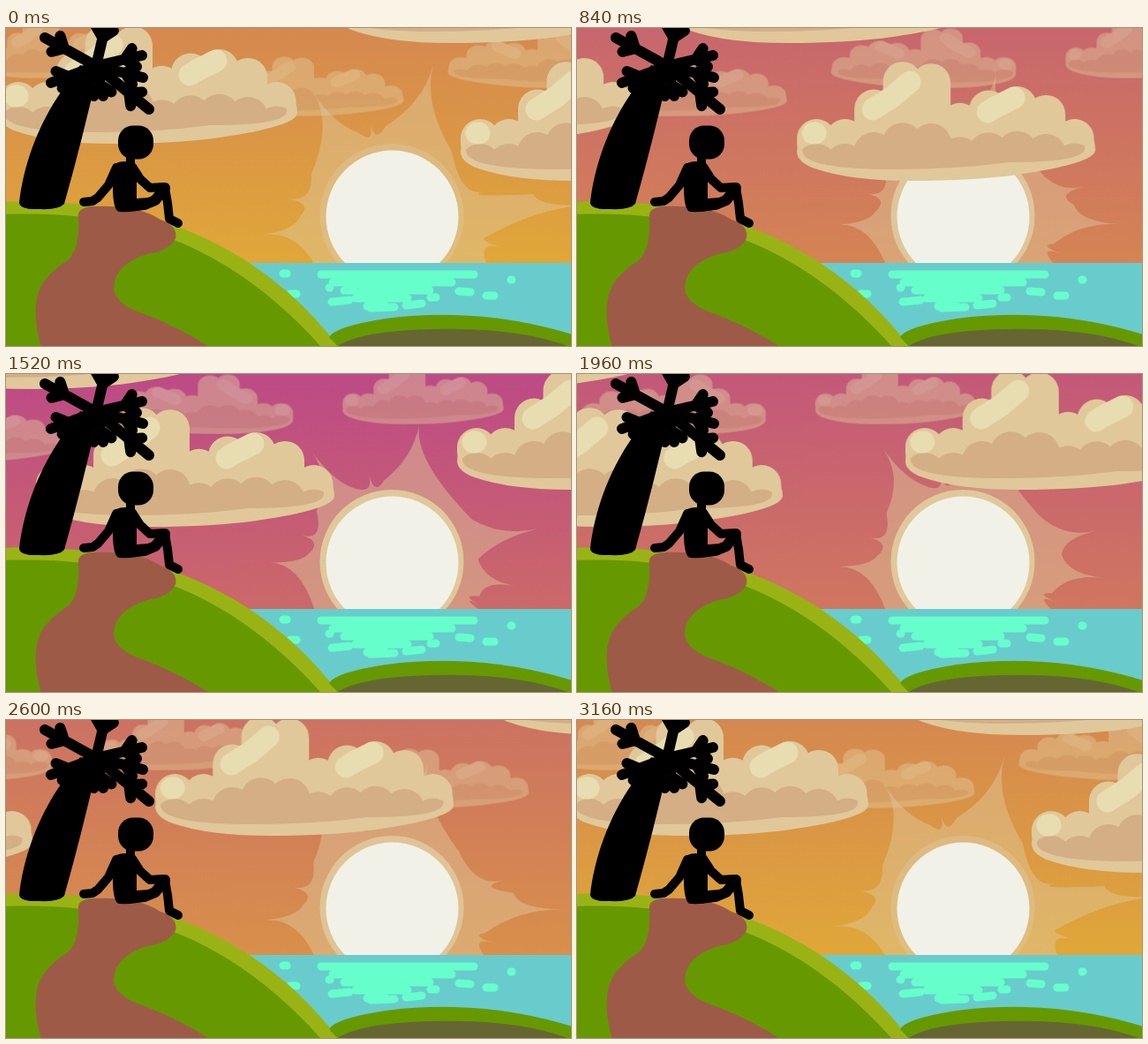
These frames come from a looping animation (640x360 px, 3.2 s). An HTML page:

```html
<!DOCTYPE html>
<html lang="en">
<head>
<meta charset="utf-8">
<title>Sunset hill</title>
<style>
html, body { margin: 0; width: 100%; height: 100%; overflow: hidden; background: #d68a52; }
svg { display: block; width: 640px; height: 360px; }
.near, .far, .dusk, .ring { animation: 3200ms infinite; }
.near { animation-name: near; animation-timing-function: steps(79); }
.far { animation-name: far; animation-timing-function: steps(79); opacity: .46; }
.dusk { animation-name: dusk; }
.ring { animation-name: ring; animation-timing-function: linear; }
@keyframes near { 98.75%, 100% { transform: translateX(-1000px); } }
@keyframes far { 98.75%, 100% { transform: translateX(-800px); } }
@keyframes dusk {
  0% { opacity: 0; animation-timing-function: steps(39); }
  48.75% { opacity: 1; animation-timing-function: steps(40); }
  98.75%, 100% { opacity: 0; }
}
@keyframes ring {
  0%, 98.75%, 100% { opacity: .45; }
  16.25%, 81.25% { opacity: .9; }
  36%, 61.5% { opacity: 1; }
}
.line { fill: none; stroke-linecap: round; stroke-linejoin: round; }
</style>
</head>
<body>
<svg viewBox="0 0 640 360">
  <defs>
    <linearGradient id="day" x2="0" y2="1">
      <stop stop-color="#d58850"/><stop offset="1" stop-color="#e0a738"/>
    </linearGradient>
    <linearGradient id="eve" x2="0" y2="1">
      <stop stop-color="#bd4988"/><stop offset="1" stop-color="#cb676c"/>
    </linearGradient>
    <clipPath id="belly">
      <path d="M6 90V140Q10 160 110 160Q180 160 240 152Q326 152 326 136V90Z"/>
    </clipPath>
    <g id="cloud">
      <path fill="#e0c89b" d="M0 140Q0 152 20 159Q60 173 130 173Q200 173 250 166Q338 153 338 138Q338 118 318 112H12Q2 120 0 140Z"/>
      <path id="puffs" class="line" stroke="#e0c89b" stroke-width="44"/>
      <g clip-path="url(#belly)">
        <path id="shade" class="line" stroke="#d4ae85" stroke-width="46"/>
      </g>
      <path class="line" stroke="#e8ddb0" stroke-width="25" d="M18 119h3M86 92L108 78L128 61M216 95L224 90L246 79"/>
    </g>
  </defs>

  <rect width="640" height="268" fill="url(#day)"/>
  <rect class="dusk" width="640" height="268" fill="url(#eve)"/>

  <g class="far" id="far"></g>

  <path id="rays" fill="#e0c89c" fill-opacity=".47"/>
  <circle class="ring" cx="437" cy="212.5" r="81.5" fill="#e0c89b"/>
  <circle cx="437.5" cy="213.5" r="75" fill="#f2f1e8"/>

  <g class="near" id="near"></g>

  <rect y="266" width="640" height="94" fill="#68cccc"/>
  <g class="line" stroke="#66ffcc" stroke-width="9">
    <path id="glitter"/>
    <path d="M314 278h4M366 294h1M369 310l20-2M413 317l27-1M453 314l18-2M513 298l13 1M572 285h1M322 301h7M481 305h6M544 303h9"/>
  </g>

  <path fill="#9ab314" d="M-5 197C120 191 270 222 376 360H-5Z"/>
  <path fill="#669900" d="M-5 211C110 207 235 225 357 361H-5Z"/>
  <path fill="#9d5b47" d="M82 215Q80 203 98 202Q150 200 175 217Q195 224 192 238Q186 252 160 256Q122 268 122 295Q124 314 160 325Q200 341 232 362H40Q24 305 48 281Q58 270 70 263Q84 250 82 215Z"/>
  <path fill="#669900" d="M366 350Q372 338 430 329Q540 315 645 348V365H380Z"/>
  <path fill="#666633" d="M374 361Q400 343 480 341Q580 338 639 361Z"/>

  <!-- palm -->
  <path d="M15 198C19 160 34 112 64 70L84 42L104 50C92 100 80 150 66 199Q60 206 38 205Q16 206 15 198Z"/>
  <path id="palm" class="line" stroke="#000" stroke-width="12"/>

  <!-- sitter -->
  <rect x="127" y="110.5" width="40" height="38" rx="17"/>
  <path d="M121 158Q124 150 137 151Q148 152 148 163V193L162 192V204Q146 209 128 208Q121 206 121 180Z"/>
  <g class="line" stroke="#000" stroke-width="10">
    <path d="M141 145V154M125 158L116 178L104 192L98 196L88 197M143 157L152 171L163 181L178 180"/>
    <path stroke-width="12" d="M132 202L157 200L169 195L180 181"/>
    <path d="M180 181L183 198L185 216L195 221"/>
  </g>
</svg>
<script>
const byId = id => document.getElementById(id);
const draw = (id, d) => byId(id).setAttribute('d', d);
const range = n => [...Array(n).keys()];

// A cloud is a row of round-topped columns under two humps; the shade repeats it, flatter.
const hump = (x, mid, width) => Math.exp(-(((x - mid) / width) ** 4));
const lift = x => 70 * hump(x, 131, 50) + 42 * hump(x, 246, 50);
const columns = (top, r, foot) => range(10).map(i => {
  const x = 22 + 32.5 * i;
  return `M${x} ${top(x) + r}V${foot}`;
}).join('');
draw('puffs', columns(x => 108 - lift(x), 22, 125));
draw('shade', columns(x => 131 - .34 * lift(x), 23, 180));

// Each cloud is placed twice, one wrap length apart.
function addClouds(id, wrap, list) {
  byId(id).innerHTML = list.flatMap(([x, y, sx = 1, sy = 1]) =>
    [x, x + wrap].map(left =>
      `<use href="#cloud" transform="translate(${left} ${y}) scale(${sx} ${sy})"/>`)
  ).join('');
}
addClouds('far', 800, [[241, 13.5, .62, .5], [710, -18.5, -.62, .5], [-34, -29.5, .54, .5]]);
addClouds('near', 1000, [[374, -156], [-8, -42], [515, 0]]);

draw('glitter', range(5).map(i => `M${357 + 13 * i} ${279 + 9 * i}H${530 - 25 * i}`).join(''));

// A frond is a spine from the crown with a pair of lobes leaning towards its tip.
function frond([tipX, tipY]) {
  const x = 102, y = 43, dx = tipX - x, dy = tipY - y, turn = Math.atan2(dy, dx);
  const lobes = [-.75, .75].map(a =>
    `M${x + dx * .62} ${y + dy * .62}l${15 * Math.cos(turn + a)} ${15 * Math.sin(turn + a)}`);
  return `M${x} ${y}L${tipX} ${tipY}` + lobes.join('');
}
draw('palm', [[44, 11], [51, 62], [114, -8], [154, 31], [155, 56], [162, 92], [110, 77]].map(frond).join(''));

// Valleys and tips take turns; the sides of a tip bend in towards the sun.
function glow(points) {
  const pts = points.split(' ').map(p => p.split(',').map(Number));
  return 'M' + pts[0] + pts.slice(1).map((p, i) => {
    const [x, y] = i % 2 ? pts[i] : p;
    return `Q${x + (437 - x) * .25} ${y + (213 - y) * .25} ${p}`;
  }).join('') + 'Z';
}
const dayGlow = glow('350,268 291,234 334,212 318,193 346,165 348,73 400,119 412,106 430,111 484,42 505,140 541,185 597,188 660,200 545,236 564,249 545,268');
const duskGlow = glow('350,268 298,213 341,205 335,182 352,155 346,88 390,128 411,114 428,121 468,57 528,165 604,175 533,210 574,241 536,252 537,262 537,268');

draw('rays', dayGlow);
const pose = (d, offset, easing = 'linear') => ({ d: `path("${d}")`, offset, easing });
byId('rays').animate([
  pose(dayGlow, 0, 'steps(39)'),
  pose(duskGlow, .4875, 'steps(40)'),
  pose(dayGlow, .9875),
  pose(dayGlow, 1)
], { duration: 3200, iterations: Infinity });
</script>
</body>
</html>
```
